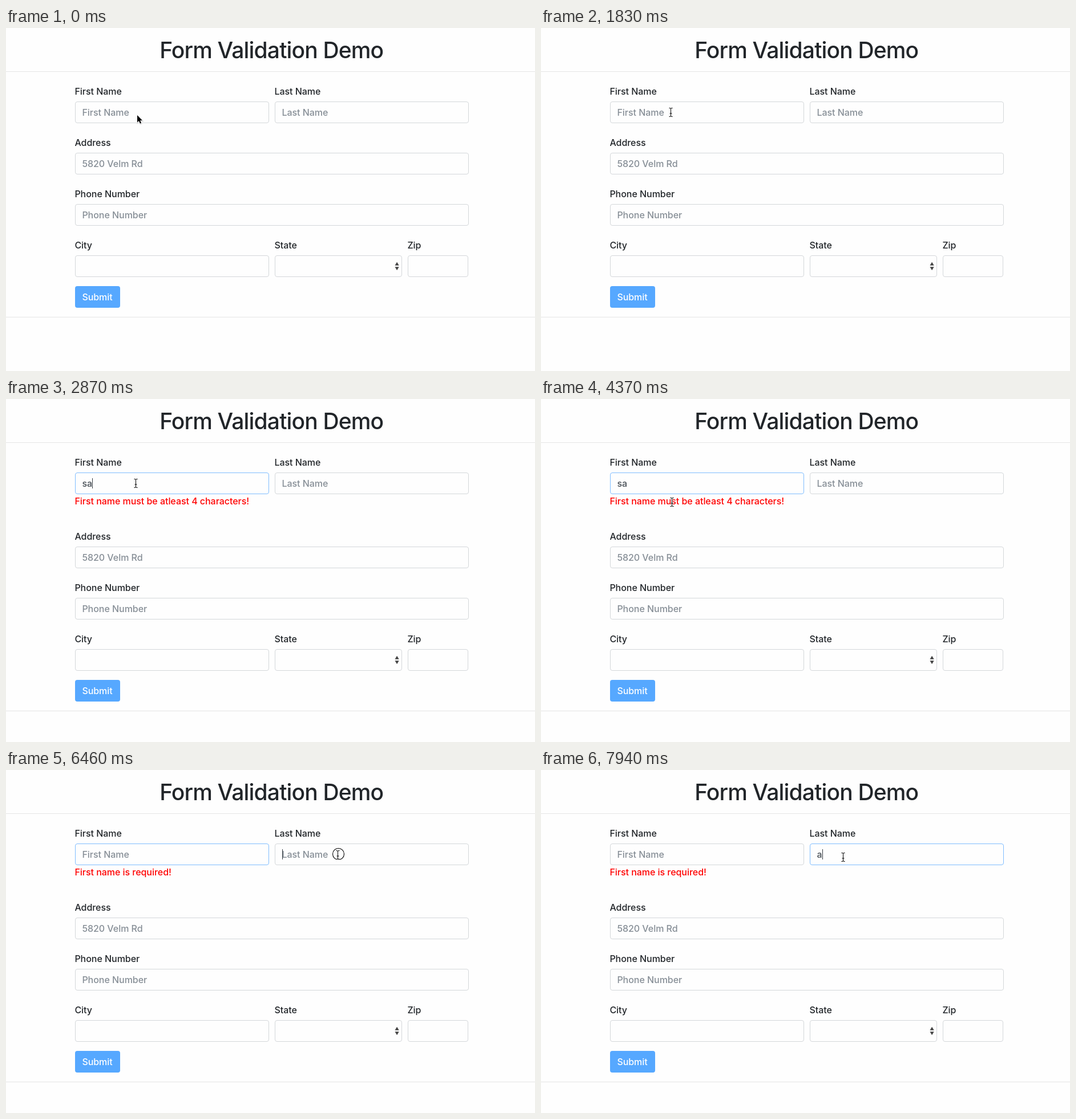
Animation of 927x602 px, one loop 8 s. Source, as an HTML page:

```html
<!DOCTYPE html>
<html lang="en">
<head>
<meta charset="utf-8">
<title>Form Validation Demo</title>
<style>
  html, body { margin: 0; width: 100%; height: 100%; overflow: hidden; background: #fefefe; }
  svg { display: block; }
  text {
    font: 450 16px Inter, "Open Sans", sans-serif; font-optical-sizing: none;
    letter-spacing: -.04px; fill: #212529; white-space: pre;
  }
  .title { font-size: 39px; font-weight: 500; letter-spacing: -.85px; text-anchor: middle; }
  .hint { fill: #868e96; }
  .value { fill: #495057; }
  .error { fill: #f00; }
  .white { fill: #fff; }
  .box { fill: #fefefe; stroke: #d4d7da; }
  .box.focus { stroke: #80bdff; }
  .rule { stroke: #e5e5e5; }
  .beam { fill: none; stroke: #000; }
  .halo { fill: none; stroke: #fff; stroke-width: 3; stroke-opacity: .8; }
</style>
</head>
<body>
<svg id="stage" width="927" height="602" viewBox="0 0 927 602"></svg>
<script>
const LOOP = 8000;
const LEAD = 483;   // ms before beat 0
const BEAT = 149;   // ms between screen updates
const BLINK = 3.33; // beats per caret phase
const stage = document.getElementById('stage');

function add(parent, tag, attrs = {}, content = '') {
  const node = document.createElementNS('http://www.w3.org/2000/svg', tag);
  for (const key in attrs) node.setAttribute(key, attrs[key]);
  node.textContent = content;
  parent.appendChild(node);
  return node;
}

const label = (parent, x, y, content, kind = '') =>
  add(parent, 'text', { x: x - .6, y, class: kind }, content);

const rule = (parent, y) =>
  add(parent, 'path', { d: `M0 ${y + .5}H927`, class: 'rule' });

// A caption, its input box and the text inside
function field(parent, x, y, width, name, hint = '') {
  label(parent, x, y - 12, name);
  const box = add(parent, 'rect', {
    x: x + .5, y: y + .5, width: width - 1, height: 37, rx: 3.5, class: 'box'
  });
  const text = label(parent, x + 13, y + 25, hint, 'hint');
  return { x: x + 13, box, text, hint };
}

label(stage, 465.8, 53, 'Form Validation Demo', 'title');
rule(stage, 76);
const first = field(stage, 121, 129, 340, 'First Name', 'First Name');
const last = field(stage, 471, 129, 340, 'Last Name', 'Last Name');
const error = label(stage, 121, 185, '', 'error');

const lower = add(stage, 'g');
field(lower, 121, 219, 690, 'Address', '5820 Velm Rd');
field(lower, 121, 309, 690, 'Phone Number', 'Phone Number');
field(lower, 121, 399, 340, 'City');
field(lower, 471, 399, 223, 'State');
field(lower, 704, 399, 106, 'Zip');
add(lower, 'path', { d: 'M681.5 416.7l3.6 -6l3.6 6zM681.5 419.3l3.6 6l3.6 -6z', fill: '#444' });
add(lower, 'rect', { x: 121, y: 453, width: 79, height: 38, rx: 4, fill: '#56a8ff' });
label(lower, 134, 478, 'Submit', 'white');
rule(lower, 507);

const caret = add(stage, 'rect', { y: 139, width: 1, height: 18, fill: '#343a40' });
const ring = add(stage, 'circle', { cx: 1, cy: -1.5, r: 10, fill: 'none', stroke: '#000', 'stroke-width': 1.1 });

const arrow = add(stage, 'g');
const arrowPath = 'M0 0V12.8L2.9 10.1L4.9 14.7L7 13.7L5.1 9.3H9Z';
add(arrow, 'path', { d: arrowPath, transform: 'translate(.4 1)', stroke: '#000', 'stroke-width': 2, opacity: .16 });
add(arrow, 'path', { d: arrowPath, stroke: '#fff', 'stroke-width': 2, 'stroke-linejoin': 'round' });
add(arrow, 'path', { d: arrowPath });

const beam = add(stage, 'g');
const beamPath = 'M-3 -7.5H-1.5Q0 -7.5 0 -6V6Q0 7.5 -1.5 7.5H-3' +
  'M3 -7.5H1.5Q0 -7.5 0 -6M0 6Q0 7.5 1.5 7.5H3M-2 2H2';
add(beam, 'path', { d: beamPath, class: 'halo' });
add(beam, 'path', { d: beamPath, class: 'beam' });

// All times below are in beats
const legs = [
  { from: 2, to: 3, x: 229.5, y: 150 },
  { from: 3, to: 4, x: 227.5, y: 148 },
  { from: 20, to: 26, x: 229.5, y: 181, sag: 32 },
  { from: 36, to: 40, x: 581.5, y: 149, sag: 33 },
  { from: 41, to: 42, x: 555.5, y: 160 },
  { from: 44, to: 50, x: 529.5, y: 153, sag: 43 }
];
const clicks = [[0, 1], [14, 16], [40, 42]];
const edits = [14, 16, 29.6, 40, 50];

const show = (node, on) => node.setAttribute('visibility', on ? 'visible' : 'hidden');
const place = (node, x, y) => node.setAttribute('transform', `translate(${x} ${y})`);

// Eased legs, each hanging below its straight line by sag
function pointerAt(beat) {
  let x = 230, y = 153;
  for (const leg of legs) {
    const u = Math.min(1, Math.max(0, (beat - leg.from) / (leg.to - leg.from)));
    const ease = u * u * (3 - 2 * u);
    x += (leg.x - x) * ease;
    y += (leg.y - y) * ease + (leg.sag || 0) * Math.sin(Math.PI * u);
    if (u < 1) break;
  }
  return [x, y];
}

function caretOn(beat) {
  const edit = edits.filter(e => e <= beat).pop();
  return edit !== undefined && Math.floor((beat - edit) / BLINK) % 2 === 0;
}

function setField(f, value, focused) {
  f.text.textContent = value || f.hint;
  f.text.setAttribute('class', value ? 'value' : 'hint');
  f.box.setAttribute('class', focused ? 'box focus' : 'box');
  f.value = value;
}

function draw(t) {
  const beat = Math.floor((t - LEAD) / BEAT);
  const checked = beat >= 16;
  const typed = !checked ? '' : 'sa'.slice(0, Math.max(0, 31 - beat));
  setField(first, typed, beat >= 15 && beat < 41);
  setField(last, beat >= 50 ? 'a' : '', beat >= 41);

  error.textContent = !checked ? '' : typed
    ? 'First name must be atleast 4 characters!' : 'First name is required!';
  place(lower, 0, checked ? 40 : 0);

  const active = beat < 40 ? first : last;
  const advance = active.value ? active.text.getComputedTextLength() : 0;
  caret.setAttribute('x', active.x + Math.floor(advance));
  show(caret, caretOn(beat));

  const [x, y] = pointerAt(beat);
  for (const node of [ring, arrow, beam]) place(node, x, y);
  show(ring, clicks.some(([from, to]) => beat >= from && beat < to));
  show(arrow, beat < 3);
  show(beam, beat >= 3);
}

const start = performance.now();
function tick() {
  draw((performance.now() - start) % LOOP);
  requestAnimationFrame(tick);
}
tick();
</script>
</body>
</html>
```
